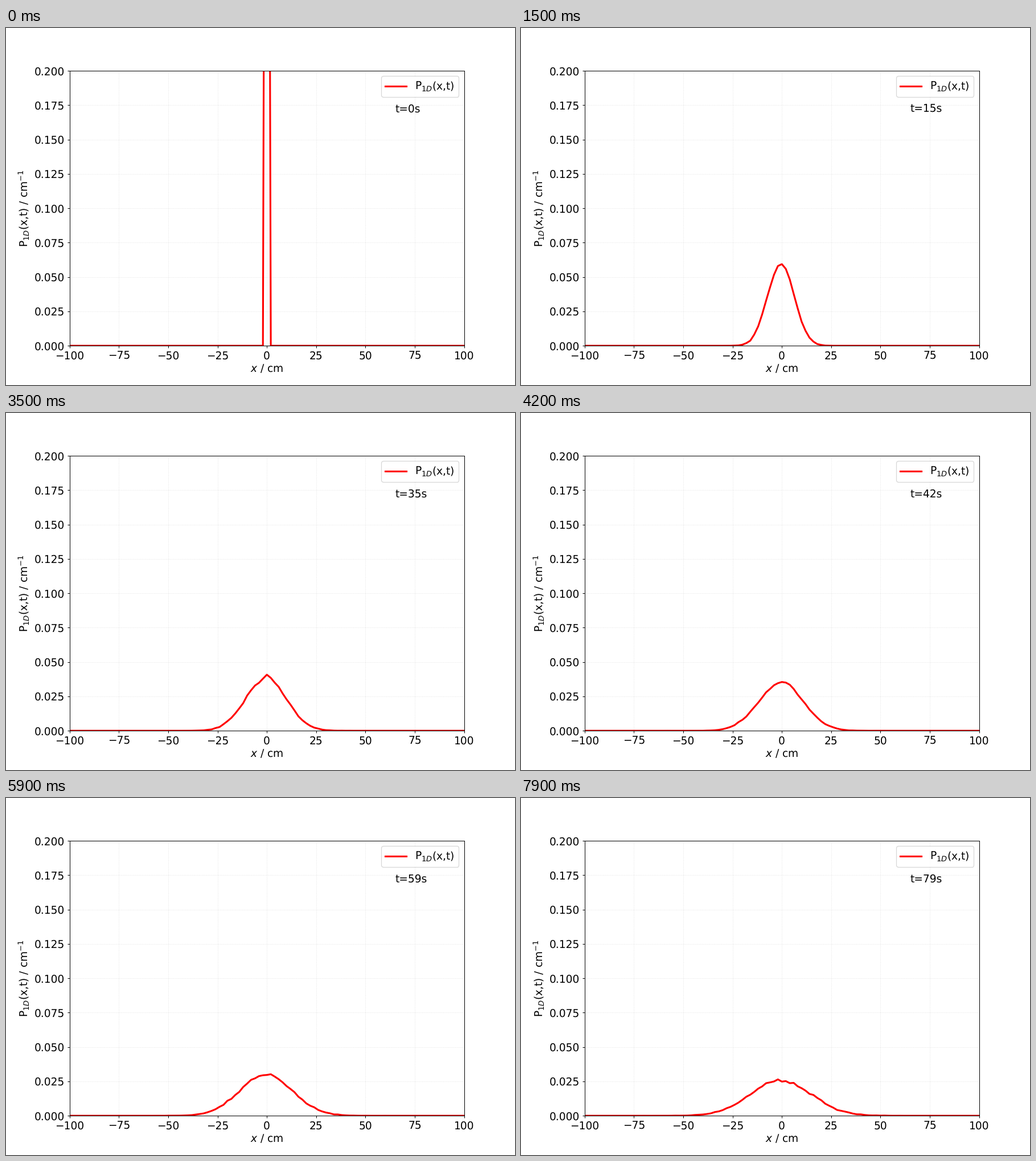
Write a matplotlib script that moves like this. It is 894 px wide and 626 px high and loops after 8000 ms.

```python
import numpy as np
import matplotlib.pyplot as plt
from matplotlib.animation import FuncAnimation

WIDTH, HEIGHT, DPI = 894, 626, 89.4
FRAMES, INTERVAL = 80, 100
WALKERS, MAX_STEP = 100_000, 3.0

plt.rcParams.update({"font.family": "DejaVu Sans", "font.size": 15,
                     "text.hinting": "none"})


def simulate():
    """Density of a 1D random walk, one row per second, sampled every 2 cm."""
    rng = np.random.default_rng(12)
    pos = np.zeros(WALKERS)
    edges = np.arange(-100, 102)
    rows = []
    for _ in range(FRAMES):
        counts, _ = np.histogram(pos, edges)
        rows.append(counts[::2] / WALKERS)
        pos += rng.uniform(-MAX_STEP, MAX_STEP, WALKERS)
    return edges[:-1:2], rows


x, density = simulate()

# The small margin guards against truncation to one pixel less.
fig, ax = plt.subplots(
    figsize=((WIDTH + 1e-3) / DPI, (HEIGHT + 1e-3) / DPI), dpi=DPI)
fig.subplots_adjust(left=0.125, right=0.9, bottom=0.11, top=0.88)

line, = ax.plot(x, density[0], color="red", lw=2.5, label="P$_{1D}$(x,t)")
clock = ax.text(65, 0.1697, "t=0s")

ax.set_xlim(-100, 100)
ax.set_ylim(0, 0.2)
ax.set_xticks(np.arange(-100, 101, 25))
ax.set_yticks(np.linspace(0, 0.2, 9))
ax.set_xlabel("$x$ / cm", labelpad=2.8)
ax.set_ylabel("P$_{1D}$(x,t) / cm$^{-1}$", labelpad=4.4)
ax.grid(ls=":", alpha=0.35)
ax.legend(loc="upper right")


def update(t):
    line.set_ydata(density[t])
    clock.set_text(f"t={t}s")
    return line, clock


anim = FuncAnimation(fig, update, frames=FRAMES, interval=INTERVAL,
                     repeat=True, repeat_delay=0)
plt.show()
```
